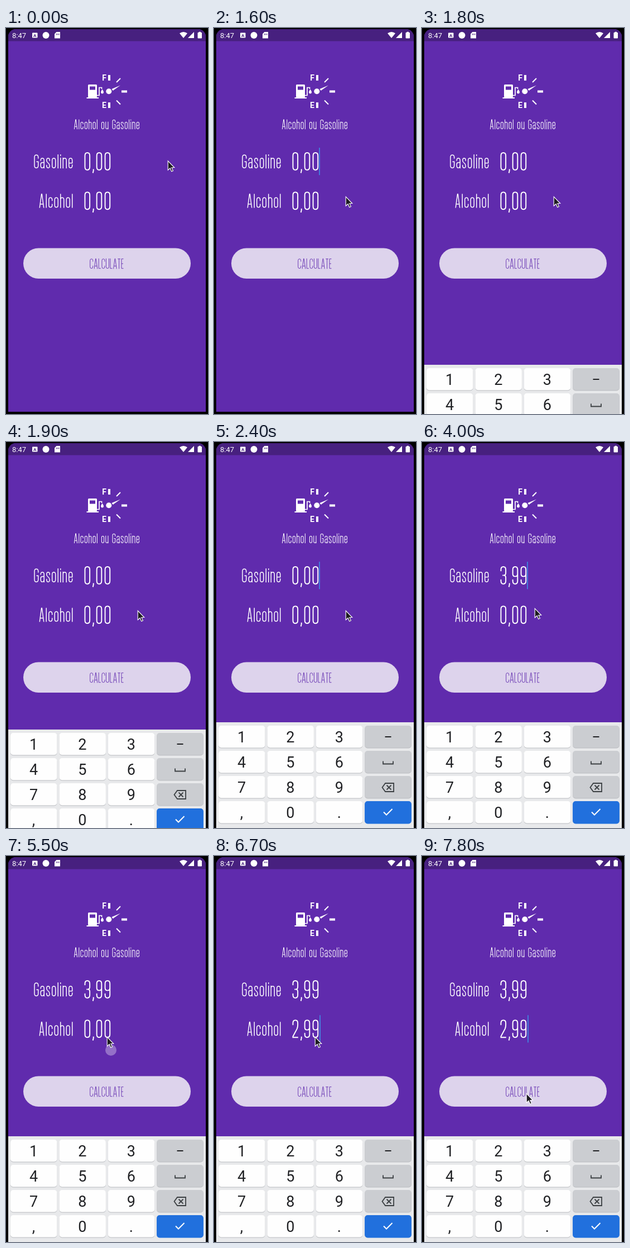
Write an HTML page with a canvas that moves like this. It is 362 px wide and 690 px high and loops after 8000 ms.

```html
<!DOCTYPE html>
<html lang="en">
<head>
<meta charset="utf-8">
<title>Fuel calculator</title>
<style>
html, body { margin: 0; width: 100%; height: 100%; overflow: hidden; background: #000; }
canvas { display: block; width: 362px; height: 690px; }
</style>
</head>
<body>
<canvas id="stage" width="362" height="690" role="img">Alcohol ou Gasoline. Gasoline 3,99. Alcohol 2,99. CALCULATE</canvas>
<script>
const ctx = document.getElementById('stage').getContext('2d');
const LOOP = 8000, STEP = 100;
const PURPLE = '#602bad', BAR = '#47207f', WHITE = '#fff', BLUE = '#2170dd';

// Condensed display lettering: stroked letters on a cap height of 100.
const R = 16, X = -73, CAP = -96, FOOT = -4;
const over = (w, y) => `Q0 ${y} ${w / 2} ${y}T${w} ${y + R}`;
const under = w => `Q${w} ${FOOT} ${w / 2} ${FOOT}T0 ${FOOT - R}`;
const ring = (w, y) => `M0 ${y + R}${over(w, y)}V${FOOT - R}${under(w)}Z`;
const hook = (w, y) => `V${FOOT - R}${under(w)}V${y + R}${over(w, y)}`;
const arch = (w, y) => `M0 ${y + R}${over(w, y)}V0`;

const letters = {
  A: [30, 'M0 0L13.5-98H16.5L30 0M4-27H26'],
  C: [27, `M27-30${hook(27, CAP)}V-70`],
  E: [18, 'M19-96H0V-4H19M0-50H16'],
  G: [27, `M14-48H27${hook(27, CAP)}V-70`],
  L: [18, 'M0-100V-4H20'],
  T: [21, 'M-2-96H23M10.5-96V0'],
  U: [27, 'M0-100V-20Q0-4 13.5-4T27-20V-100'],
  a: [24, `M0-54V${X + R}${over(24, X)}V0M24-42H12Q0-42 0-30V-20Q0-4 11-4T24-18`],
  c: [24, `M24-28${hook(24, X)}V-50`],
  e: [24, `M24-28${hook(24, X)}V-38H0`],
  h: [24, 'M0 0V-100' + arch(24, X)],
  i: [0, 'M0 0V-77M0-100V-89'],
  l: [0, 'M0 0V-100'],
  n: [24, 'M0 0V-77' + arch(24, X)],
  o: [24, ring(24, X)],
  s: [22, `M22-53V-59Q22 ${X} 11 ${X}T0-57Q0-47 11-39T22-19Q22-4 11-4T0-20V-25`],
  u: [24, 'M0-77V-20Q0-4 12-4T24-20M24-77V0'],
  0: [26, ring(26, CAP)],
  2: [26, `M0-70V-80${over(26, CAP)}V-70Q26-60 22-50L0-9V-4H28`],
  3: [26, `M0-72V-80${over(26, CAP)}V-62Q26-50 15-50H8M15-50Q26-50 26-38V-20${under(26)}V-28`],
  9: [26, `M0-80${over(26, CAP)}V-20${under(26)}V-28M0-80V-58Q0-44 13-44T26-58`],
  ',': [0, 'M1-8V0L-2 13'],
  ' ': [10, '']
};
for (const k in letters) letters[k][1] = new Path2D(letters[k][1]);

// align: 0 = left edge at x, 0.5 = centre, 1 = right edge
function write(text, x, base, cap, align, gap = 11, weight = 5.8, color = WHITE) {
  const advance = c => letters[c][0] + 7 + gap;
  const width = [...text].reduce((sum, c) => sum + advance(c), -gap);
  ctx.save();
  ctx.translate(x, base);
  ctx.scale(cap / 100, cap / 100);
  ctx.translate(3.5 - width * align, 0);
  ctx.strokeStyle = color;
  ctx.lineWidth = weight;
  for (const c of text) {
    ctx.stroke(letters[c][1]);
    ctx.translate(advance(c), 0);
  }
  ctx.restore();
}

function rect(x, y, w, h, color, r = 0) {
  ctx.fillStyle = color;
  ctx.beginPath();
  ctx.roundRect(x, y, w, h, r);
  ctx.fill();
}

function disc(x, y, r, color) {
  ctx.fillStyle = color;
  ctx.beginPath();
  ctx.arc(x, y, r, 0, 7);
  ctx.fill();
}

function fill(path, color = WHITE) {
  ctx.fillStyle = color;
  ctx.fill(new Path2D(path));
}

function line(path, color = WHITE, width = 2) {
  ctx.strokeStyle = color;
  ctx.lineWidth = width;
  ctx.stroke(new Path2D(path));
}

function label(text, x, y, font, color, align = 'center') {
  ctx.font = font + ' Roboto, sans-serif';
  ctx.fillStyle = color;
  ctx.textAlign = align;
  ctx.fillText(text, x, y);
}

function statusBar() {
  label('8:47', 11, 17.5, '13px', WHITE, 'left');
  rect(47, 8.5, 9.5, 9, WHITE, 1);
  label('A', 51.8, 16, 'bold 8px', BAR);
  disc(71.5, 13, 6, WHITE);
  fill('M90.5 7H97V18.5H87V10.5Z');
  line('M90.5 10V12.5M92.7 10V12.5M94.9 10V12.5', BAR, 1);
  fill('M311 9.5Q318 4.5 325 9.5L318 18Z');
  fill('M337 7V18H326Z');
  rect(343.5, 8, 7.5, 10.5, WHITE, 1);
  rect(345.5, 6.8, 3.5, 2, WHITE);
}

function gauge() {
  label('F', 176, 94, 'bold 14px', WHITE);
  label('E', 176, 143, 'bold 14px', WHITE);
  rect(183, 84, 4, 10, WHITE);
  rect(183, 133, 4, 10, WHITE);
  rect(207, 111.5, 10, 4, WHITE);
  line('M198 97L205 90M198 129.5L205 136.5');
  disc(184.3, 113.3, 5, WHITE);
  fill('M189.5 109L205 102.5L191.5 112Z');
  rect(147, 101, 16, 23, WHITE, 1.5);
  rect(150, 104.5, 10, 6, PURPLE);
  rect(144.5, 124, 21.5, 2, WHITE);
  line('M163 120.5H167V106.5H171.5V109', WHITE, 1.7);
  fill('M172.5 109.5Q177.5 116.5 172.5 117.5Q167.5 116.5 172.5 109.5Z');
}

function keyboard(top) {
  ctx.save();
  ctx.translate(0, top);
  rect(4, 0, 354, 690, '#e8e9eb');
  const rows = ['123-', '456_', '789<', ',0.!'];
  rows.forEach((row, j) => [...row].forEach((c, i) => {
    const x = 8 + i * 87.4, y = 6 + j * 45;
    const color = c === '!' ? BLUE : i === 3 ? '#cbcdd1' : '#fefefe';
    rect(x, y + 1, 83.5, 39.5, c === '!' ? BLUE : '#b9bbbf', 5);
    rect(x, y, 83.5, 39.5, color, 5);
    if (i < 3) label(c, x + 41.5, y + 30, '27px', '#202124');
  }));
  const ink = '#3c4043';
  line('M306.5 26H317.5', '#202124');
  line('M303 69.5V74.5H321V69.5', ink, 1.8);
  line('M307 109H322V124H307L301.5 116.5Z', ink, 1.8);
  line('M309.5 112.5L317.5 120.5M317.5 112.5L309.5 120.5', ink, 1.8);
  line('M304 160.5L309 165.5L319.5 155', WHITE, 2);
  ctx.restore();
}

// Pointer path: time, x, y
const path = [
  [100, 290, 237], [400, 250, 233], [700, 190, 242], [1100, 188, 243],
  [1200, 239, 306], [1500, 239, 306], [1600, 236, 301], [3200, 236, 301],
  [3400, 238, 312], [3600, 236, 324], [3800, 215, 312], [4000, 202, 297],
  [4100, 202, 292], [4200, 195, 289], [4300, 195, 289], [4400, 198, 298],
  [4500, 192, 303], [4900, 192, 303], [5000, 186, 314], [5100, 181, 323],
  [7100, 181, 323], [7300, 160, 360], [7500, 153, 420], [7600, 160, 448],
  [7800, 187, 424], [8000, 187, 424]
];

function pointerAt(t) {
  if (t <= path[0][0]) return path[0].slice(1);
  const i = path.findIndex(p => p[0] >= t);
  const [t0, x0, y0] = path[i - 1], [t1, x1, y1] = path[i];
  const k = (t - t0) / (t1 - t0);
  return [x0 + (x1 - x0) * k, y0 + (y1 - y0) * k];
}

function pointer(x, y) {
  ctx.save();
  ctx.translate(x + 0.2, y + 0.5);
  const arrow = 'M0 0V16.5L4 13L6.5 19L9.2 17.8L6.7 12H11.5Z';
  fill(arrow, '#1d1b20');
  line(arrow, WHITE, 1.1);
  ctx.restore();
}

const touches = [[800, 1200, 197, 268], [1200, 1600, 246, 329], [5100, 6200, 188, 347]];
const gasSteps = [[0, '0,00'], [2600, '0,03'], [2700, '0,39'], [3900, '3,99']];
const alcoholSteps = [[0, '0,00'], [6200, '0,02'], [6700, '2,99']];
const gasCaret = [[1200, 1800], [2400, 3300], [3800, 4400]];
const alcoholCaret = [[5000, 5500], [5900, 7200], [7700, 8000]];

const during = (t, [from, to]) => t >= from && t < to;
const valueAt = (steps, t) => steps.filter(s => s[0] <= t).pop()[1];

function field(steps, carets, t, base) {
  const value = valueAt(steps, t);
  write(value, 140.3, base, 33.3, 0, 11.8, 5.8);
  const x = value.includes('2') ? 189 : 188;
  if (carets.some(c => during(t, c))) rect(x, base - 41, 2, 49, '#437bdb');
}

function draw(t) {
  rect(0, 0, 362, 690, '#000');
  rect(4, 2, 354, 684, PURPLE, [14, 14, 0, 0]);
  rect(4, 2, 354, 21.5, BAR, [14, 14, 0, 0]);
  statusBar();
  gauge();
  write('Alcohol ou Gasoline', 180.4, 181, 17.5, 0.5);
  write('Gasoline', 119.6, 251, 25, 1);
  write('Alcohol', 119.6, 321.5, 25, 1);
  field(gasSteps, gasCaret, t, 255);
  field(alcoholSteps, alcoholCaret, t, 325.5);
  rect(31, 393.5, 300, 54.5, '#ddd3ec', 27.2);
  write('CALCULATE', 180.5, 430.5, 18.5, 0.5, 6.3, 5, '#6430b0');

  if (t >= 1800) keyboard(501 + Math.round(101 * Math.exp(-2.05 * (t - 1800) / 100)));
  for (const [from, to, x, y] of touches) {
    if (during(t, [from, to])) disc(x, y, 10, 'rgba(255,255,255,.33)');
  }
  pointer(...pointerAt(t));
}

const start = performance.now();
function frame() {
  const t = (performance.now() - start) % LOOP;
  draw(Math.floor(t / STEP) * STEP);
  requestAnimationFrame(frame);
}
frame();
</script>
</body>
</html>
```
